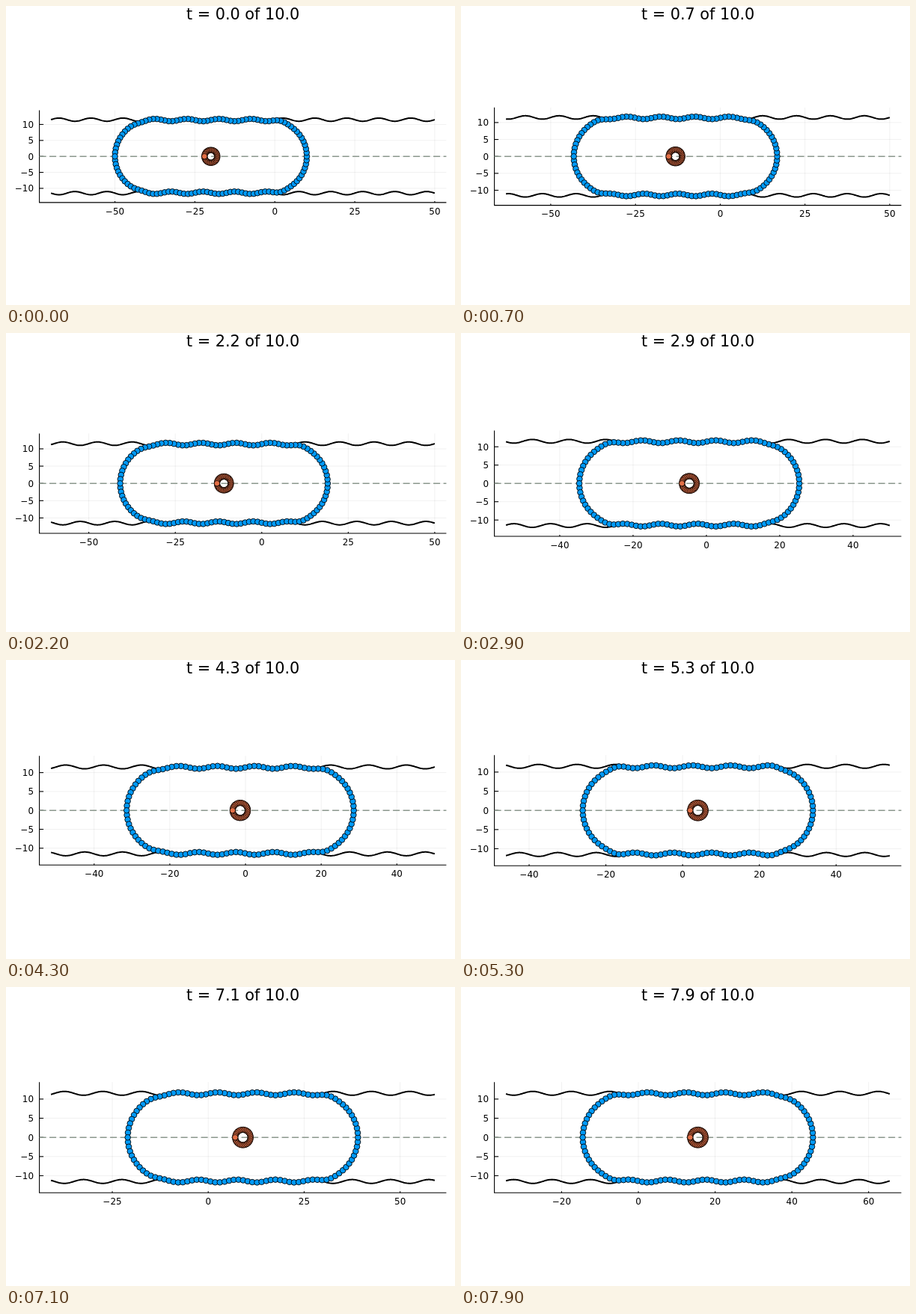
Recreate the animation shown at these times as an HTML page with a canvas. Size 600 by 400 pixels, loop 8000 ms.

```html
<!DOCTYPE html>
<html lang="en">
<head>
<meta charset="utf-8">
<title>Cell in a wavy channel</title>
<style>
html, body { margin: 0; width: 100%; height: 100%; overflow: hidden; background: #fff; }
canvas { display: block; width: 600px; height: 400px; }
</style>
</head>
<body>
<canvas id="stage" width="600" height="400"></canvas>
<script>
const ctx = document.getElementById('stage').getContext('2d');
const FONT = '"DejaVu Sans", Verdana, sans-serif';
const LEFT = 44.6, RIGHT = 588.4, MID = 201.2, PAD = 15.5;
const HALF_Y = 14.44, HALF_LEN = 30, CAP = 11.5, NODES = 120, RING = 30;
const BLUE = '#009af9', ORANGE = '#e26f46';
const LOOP = 8000, STEP = 100;

// Known positions of the cell centre: [time, x]
const KEYS = [[0, -20], [1.4, -11.98], [2.9, -4.66], [4.3, -1.4], [5.3, 3.97], [6.1, 7.86], [7.9, 15.5]];

// Stick-slip drift over a channel with period 10; one unit of phase is one period
const REST = -1.8, RATIO = 4;
function phaseAt(x) {
  const u = (x - REST) / 10, n = Math.round(u);
  return n + Math.atan(RATIO * Math.tan(Math.PI * (u - n))) / Math.PI;
}
function driftAt(phase) {
  const n = Math.round(phase);
  return REST + 10 * (n + Math.atan(Math.tan(Math.PI * (phase - n)) / RATIO) / Math.PI);
}
function centreAt(t) {
  let i = 0;
  while (i < KEYS.length - 2 && t > KEYS[i + 1][0]) i++;
  const [t0, x0] = KEYS[i], [t1, x1] = KEYS[i + 1];
  const p0 = phaseAt(x0), p1 = phaseAt(x1);
  return driftAt(p0 + (p1 - p0) * (t - t0) / (t1 - t0));
}

const ripple = x => Math.sin(2 * Math.PI * x / 10);
const wall = x => 11.5 + 0.5 * ripple(x);

// Round caps; the ripple fades out where the membrane leaves the wall
function membrane(c, dx) {
  const over = Math.max(0, Math.abs(dx) - (HALF_LEN - CAP)) / CAP;
  const cap = Math.sqrt(Math.max(0, 1 - over * over));
  return 11.38 * cap + 0.37 * ripple(c + dx) * cap ** 8;
}

// Upper half of the outline, left to right, at equal arc lengths
function upperNodes(c) {
  const M = 1500, pts = [], len = [0];
  for (let i = 0; i <= M; i++) {
    const dx = -HALF_LEN * Math.cos(Math.PI * i / M);
    pts.push([c + dx, membrane(c, dx)]);
    if (i) len.push(len[i - 1] + Math.hypot(pts[i][0] - pts[i - 1][0], pts[i][1] - pts[i - 1][1]));
  }
  const out = [], n = NODES / 2;
  for (let k = 0, i = 0; k <= n; k++) {
    while (i < M && len[i] < len[M] * k / n) i++;
    out.push(pts[i]);
  }
  return out;
}

function line(x0, y0, x1, y1) {
  ctx.beginPath();
  ctx.moveTo(x0, y0);
  ctx.lineTo(x1, y1);
  ctx.stroke();
}

function pen(color, width) {
  ctx.strokeStyle = color;
  ctx.lineWidth = width;
}

function text(s, x, y, size, align) {
  ctx.font = size + 'px ' + FONT;
  ctx.textAlign = align;
  ctx.fillStyle = '#000';
  ctx.fillText(s, x, y);
}

function ticksIn(lo, hi, step) {
  const out = [];
  for (let k = Math.ceil(lo / step); k * step <= hi; k++) out.push(k * step);
  return out;
}

const label = v => String(v).replace('-', '\u2212');

function draw(t) {
  const c = centreAt(t);
  const lo = c - 50, hi = Math.max(50, c + 50);
  const scale = (RIGHT - LEFT - 2 * PAD) / (hi - lo);
  const X = x => LEFT + PAD + (x - lo) * scale;
  const Y = y => MID - y * scale;
  const top = Y(HALF_Y), bottom = Y(-HALF_Y), pad = PAD / scale;

  let xs = ticksIn(lo - pad, hi + pad, 20);
  if (xs.length !== 5) xs = ticksIn(lo - pad, hi + pad, 25);
  const ys = ticksIn(-HALF_Y, HALF_Y, 5);

  ctx.fillStyle = '#fff';
  ctx.fillRect(0, 0, 600, 400);
  text('t = ' + t.toFixed(1) + ' of 10.0', 316.6, 18, 20.8, 'center');

  pen('rgba(0,0,0,0.06)', 1);
  for (const x of xs) line(X(x), top, X(x), bottom);
  for (const y of ys) line(LEFT, Y(y), RIGHT, Y(y));

  pen('#000', 1.1);
  line(LEFT, top, LEFT, bottom);
  line(LEFT - 0.5, bottom, RIGHT, bottom);
  for (const x of xs) {
    line(X(x), bottom, X(x), bottom - 2);
    text(label(x), X(x), bottom + 15.7, 11.9, 'center');
  }
  for (const y of ys) {
    line(LEFT, Y(y), LEFT + 5.5, Y(y));
    text(label(y), 37, Y(y) + 4.5, 11.9, 'right');
  }

  pen('#000', 2);
  for (const side of [1, -1]) {
    ctx.beginPath();
    for (let i = 0; i <= 500; i++) {
      const x = lo + (hi - lo) * i / 500;
      ctx.lineTo(X(x), Y(side * wall(x)));
    }
    ctx.stroke();
  }

  pen('#8b988d', 1.4);
  ctx.setLineDash([9, 4.5]);
  line(LEFT, MID, RIGHT, MID);
  ctx.setLineDash([]);

  pen('#000', 0.9);
  const dot = (x, y, color) => {
    ctx.beginPath();
    ctx.arc(X(x), Y(y), 3.8, 0, 2 * Math.PI);
    ctx.fillStyle = color;
    ctx.fill();
    ctx.stroke();
  };
  const half = upperNodes(c);
  for (const [x, y] of half.slice(1, -1)) dot(x, -y, BLUE);
  for (const [x, y] of half.reverse()) dot(x, y, BLUE);

  for (let k = 1; k <= RING; k++) {
    const a = -Math.PI + 2 * Math.PI * k / RING;
    dot(c + 2 * Math.cos(a), 2 * Math.sin(a), ORANGE);
  }
}

let start = null;
function tick(now) {
  if (start === null) start = now;
  const ms = Math.max(0, now - start) % LOOP;
  draw(Math.floor(ms / STEP) / 10);
  requestAnimationFrame(tick);
}
draw(0);
requestAnimationFrame(tick);
</script>
</body>
</html>
```
